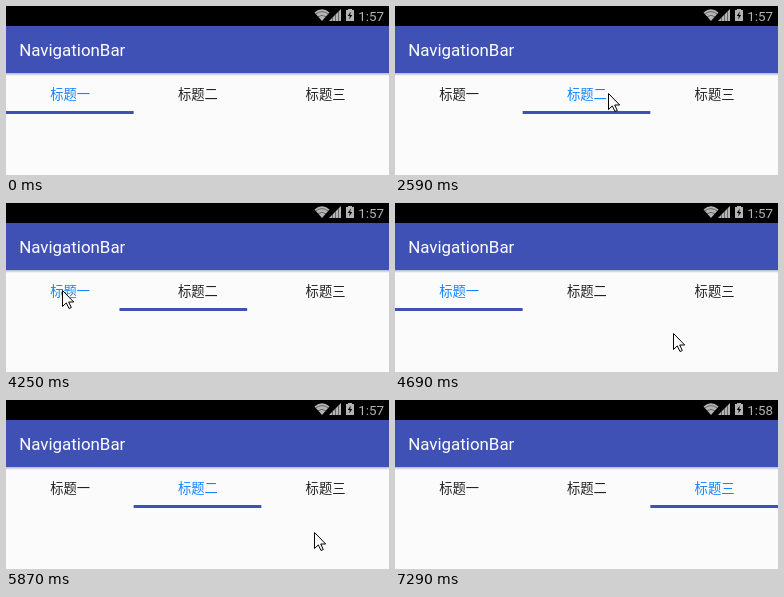
Recreate the animation shown at these times as an HTML page. Size 383 by 169 pixels, loop 7.51 s.

```html
<!DOCTYPE html>
<html lang="zh">
<head>
<meta charset="utf-8">
<title>NavigationBar</title>
<style>
html, body { margin: 0; width: 100%; height: 100%; overflow: hidden; background: #fbfbfb; }
svg { display: block; width: 383px; height: 169px; }
text { font-family: Roboto, "Noto Sans", sans-serif; }
.tab { font-family: "Noto Sans CJK SC", "Noto Sans CJK", sans-serif; font-size: 13.3px; text-anchor: middle; }
</style>
</head>
<body>
<svg viewBox="0 0 383 169">
  <defs>
    <linearGradient id="shadow" x2="0" y2="1">
      <stop stop-color="#b0b4d2"/>
      <stop offset="1" stop-color="#fbfbfb"/>
    </linearGradient>
  </defs>
  <rect width="383" height="169" fill="#fbfbfb"/>
  <rect width="383" height="20"/>
  <rect y="20" width="383" height="47" fill="#3f51b5"/>
  <rect y="67" width="383" height="3" fill="url(#shadow)"/>

  <g fill="#b4b4b4">
    <path d="M308.5 6.5Q316 0 323.5 6.5L316 15Z"/>
    <path d="M335 3V15H323Z"/>
    <path d="M342 4V3H346V4H348V15H340V4Z"/>
  </g>
  <path d="M309.5 8.2Q316 3 322.5 8.2M312 10.8Q316 7.8 320 10.8M326.5 11V15M329.5 8V15M332.5 5V15"
        fill="none" stroke="#333" stroke-width=".6"/>
  <path d="M344.8 5.5L341.8 10H343.8L343.2 13.5L346.2 9H344.2Z"/>
  <text id="clock" x="352.3" y="15" font-size="13.4" fill="#b4b4b4"></text>
  <text x="13.2" y="50" font-size="16.9" fill="#fff">NavigationBar</text>

  <g id="tabs"></g>
  <rect id="indicator" y="105" height="3" fill="#3f51b5"/>
  <path id="cursor" d="M.5 .5V16.5L4.3 12.9L7 18.5L9.3 17.5L6.7 12H11.7Z" fill="#fff" stroke="#000"/>
</svg>
<script>
const LOOP = 7510, CLOCK_TICK = 7290;
const TAB_WIDTH = 383 / 3, SLIDE_STEPS = 3, STEP = 75;
const $ = id => document.getElementById(id);
const clock = $('clock'), indicator = $('indicator'), cursor = $('cursor');

const tabs = ['标题一', '标题二', '标题三'].map((label, i) => {
  const el = document.createElementNS('http://www.w3.org/2000/svg', 'text');
  el.setAttribute('class', 'tab');
  el.setAttribute('x', (i + .5) * TAB_WIDTH + .4);
  el.setAttribute('y', 93);
  el.textContent = label;
  $('tabs').append(el);
  return el;
});
indicator.setAttribute('width', TAB_WIDTH);

const easeOut = p => 1 - (1 - p) ** 2;
const mix = (a, b, p) => a + (b - a) * p;
const overTab = i => ({ x: 56 + i * TAB_WIDTH, y: 87 });

const clicks = [
  { at: 0, tab: 0 }, { at: 2230, tab: 1 }, { at: 3230, tab: 2 },
  { at: 4250, tab: 0 }, { at: 5300, tab: 1 }, { at: 6100, tab: 2 }
];

// The pointer appears at the entry, then sets off for each place in turn.
const entry = { at: 1620, x: 209, y: 146 };
const trips = [
  { at: 1680, ...overTab(1) },
  { at: 2554, ...overTab(2) },
  { at: 3415, ...overTab(0) },
  { at: 4405, x: 318, y: 138 },
  { at: 5000, ...overTab(1) },
  { at: 5430, x: 308, y: 132 },
  { at: 5880, ...overTab(2) },
  { at: 6270, x: 378, y: 169 }
];

function pointerAt(t) {
  if (t < entry.at) return null;
  const i = trips.findLastIndex(trip => trip.at <= t);
  if (i < 0) return entry;
  const from = trips[i - 1] || entry, to = trips[i];
  const duration = 150 + 1.2 * Math.hypot(to.x - from.x, to.y - from.y);
  const p = (t - to.at) / duration;
  if (p >= 1) return i === trips.length - 1 ? null : to;
  return { x: mix(from.x, to.x, easeOut(p)), y: mix(from.y, to.y, easeOut(p)) };
}

function render(t) {
  const current = clicks.findLastIndex(click => click.at <= t);
  const { at, tab } = clicks[current];
  const previous = current ? clicks[current - 1].tab : tab;
  const p = Math.min(1, (Math.floor((t - at) / STEP) + 1) / SLIDE_STEPS);
  indicator.setAttribute('x', mix(previous, tab, easeOut(p)) * TAB_WIDTH);
  tabs.forEach((el, i) => el.setAttribute('fill', i === tab ? '#1485ff' : '#222'));

  const tip = pointerAt(t);
  cursor.setAttribute('visibility', tip ? 'visible' : 'hidden');
  if (tip) cursor.setAttribute('transform', `translate(${Math.round(tip.x)} ${Math.round(tip.y)})`);
  clock.textContent = t < CLOCK_TICK ? '1:57' : '1:58';
}

function frame() {
  render(performance.now() % LOOP);
  requestAnimationFrame(frame);
}
frame();
</script>
</body>
</html>
```
